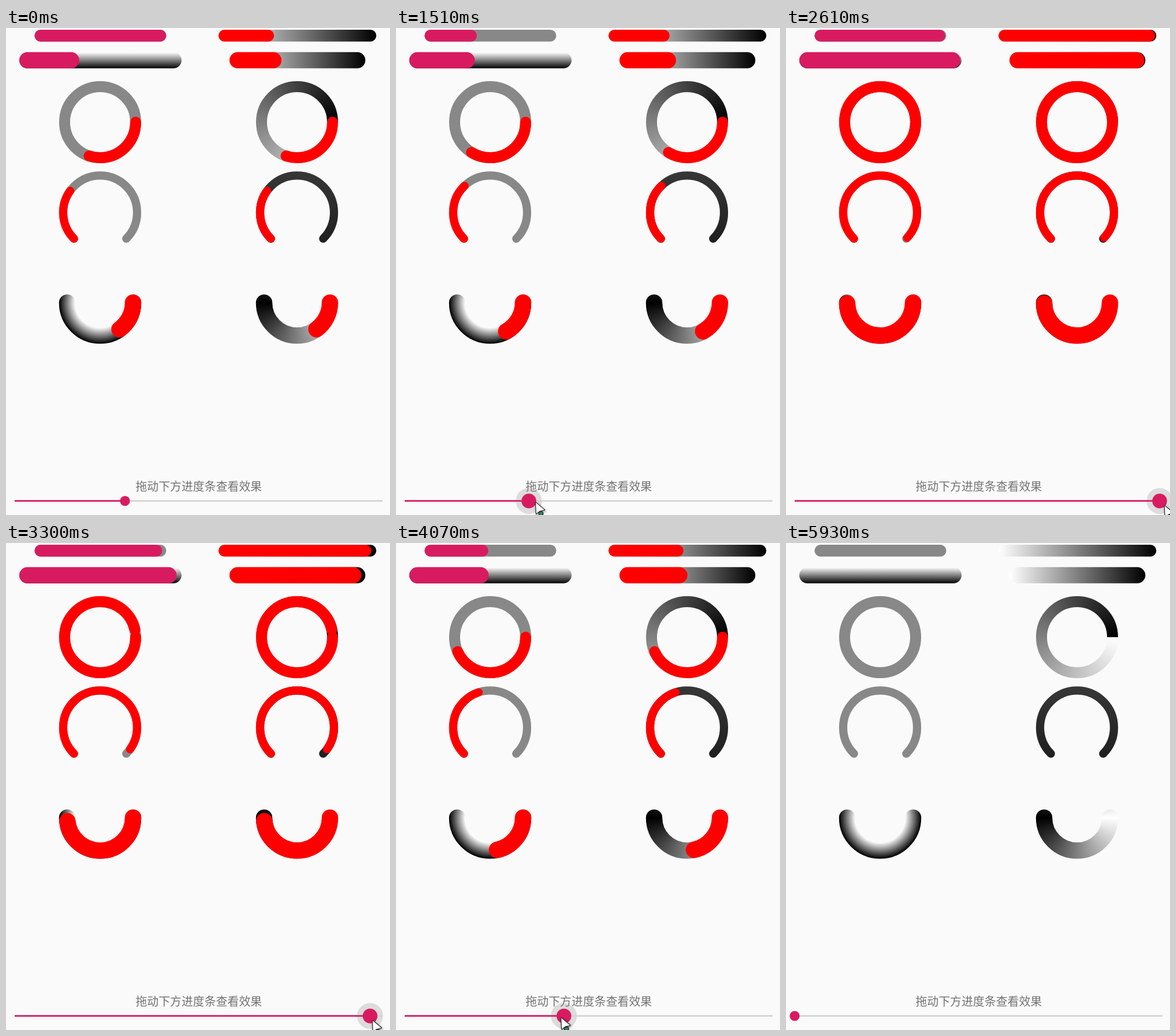
Animation, 665 px wide and 843 px high, one loop 7.11 s. Source, as an HTML page with a canvas:

```html
<!DOCTYPE html>
<html lang="zh-CN">
<head>
<meta charset="utf-8">
<title>进度条</title>
<style>
html, body { margin: 0; width: 100%; height: 100%; overflow: hidden; background: #fafafa; }
canvas { display: block; }
</style>
</head>
<body>
<canvas id="stage" width="665" height="843"></canvas>
<script>
const ctx = document.getElementById('stage').getContext('2d');
const LOOP = 7110, FRAME = 77, TAU = Math.PI * 2, RAD = Math.PI / 180;
const PINK = '#d81b60', RED = '#ff0000', GRAY = '#888888';
const TRACK = { left: 15, right: 652, y: 818.7 };
const REST_X = 206;

const mix = (a, b, k) => a + (b - a) * k;
const ramp = (t, from, to) => Math.min(1, Math.max(0, (t - from) / (to - from)));
const smooth = u => u * u * (3 - 2 * u);
const smoother = u => u * u * u * (u * (6 * u - 15) + 10);
const easeOut = (u, power) => 1 - (1 - u) ** power;

// Each burst of movement advances in discrete steps.
const bursts = [5460, 3300, 1050, 280];
function stepped(t) {
  const start = bursts.find(time => t >= time - 10);
  return start === undefined ? 0 : start + Math.floor((t - start + 10) / FRAME) * FRAME;
}

const forward = t => ramp(t, 1210, 2760);
const back = t => ramp(t, 3210, 4763);

function thumbAt(t) {
  const u = back(t);
  const reached = mix(REST_X, TRACK.right, smoother(forward(t)));
  return mix(reached, TRACK.left, (u + smooth(u)) / 2);
}

// The pointer runs slightly ahead of the thumb while dragging.
function cursorAt(t) {
  if (t < 280) return null;
  if (t < 1140) {
    const arrival = easeOut(ramp(t, 280, 670), 2);
    return [mix(353, REST_X + 6, arrival), mix(834, 818, arrival)];
  }
  if (t < 4700) {
    const out = forward(t), turn = easeOut(back(t), 4);
    const lead = 6 + 15 * Math.sin(Math.PI * out) ** 2 - 12 * turn;
    return [thumbAt(t) + lead, 818 + 8 * out - 6 * turn];
  }
  return t >= 5840 && t < 5920 ? [120, 832] : null;
}

function withStops(gradient, ...colors) {
  colors.forEach((color, i) => gradient.addColorStop(i / (colors.length - 1), color));
  return gradient;
}
const linear = (x0, y0, x1, y1, ...colors) => withStops(ctx.createLinearGradient(x0, y0, x1, y1), ...colors);
const sweep = (x, y, ...colors) => withStops(ctx.createConicGradient(0, x, y), ...colors);
const ringwise = (x, y, r0, r1, ...colors) => withStops(ctx.createRadialGradient(x, y, r0, x, y, r1), ...colors);

const thin = { y: 13.2, width: 20.4 };
const thick = { y: 55.8, width: 28 };
const bars = [
  { ...thin, left: 49.5, right: 277.5, track: GRAY, fill: PINK, startsFull: true },
  { ...thick, left: 23, right: 304, track: linear(0, 42, 0, 70, '#fff', '#000'), fill: PINK },
  { ...thin, left: 368, right: 641.3, track: linear(368, 0, 641, 0, '#fff', '#000'), fill: RED },
  { ...thick, left: 387, right: 622.3, track: linear(387, 0, 622, 0, '#fff', '#000'), fill: RED }
];

const ring = { y: 163, r: 61.5, width: 19, from: 0, span: 360, cap: 'butt' };
const gauge = { y: 319.4, r: 64, width: 14.2, from: 135, span: 270, cap: 'round' };
const bowl = { y: 475.4, r: 57, width: 28.4, from: 0, span: 180, cap: 'round' };
const arcs = [
  { ...ring, x: 163, track: GRAY },
  { ...ring, x: 504, track: sweep(504, ring.y, '#fff', '#000') },
  { ...gauge, x: 163, track: GRAY },
  { ...gauge, x: 504, track: linear(0, 248, 0, 372, '#373737', '#1f1f1f') },
  { ...bowl, x: 163, track: ringwise(163, bowl.y, 43, 71, '#fff', '#000') },
  { ...bowl, x: 504, track: sweep(504, bowl.y, '#fff', '#000', '#fff') }
];

function stroke(style, width, cap) {
  ctx.strokeStyle = style;
  ctx.lineWidth = width;
  ctx.lineCap = cap;
  ctx.stroke();
}

function line(x0, x1, y, width, style, cap = 'round') {
  ctx.beginPath();
  ctx.moveTo(x0, y);
  ctx.lineTo(x1, y);
  stroke(style, width, cap);
}

function disc(x, y, r, style) {
  ctx.beginPath();
  ctx.arc(x, y, r, 0, TAU);
  ctx.fillStyle = style;
  ctx.fill();
}

function drawBar({ left, right, y, width, track, fill }, progress) {
  const x0 = left + width / 2, x1 = right - width / 2;
  line(x0, x1, y, width, track);
  if (progress > 0) line(x0, mix(x0, x1, progress), y, width, fill);
}

function drawArc(arc, progress) {
  const part = (amount, style, cap) => {
    ctx.beginPath();
    ctx.arc(arc.x, arc.y, arc.r, arc.from * RAD, (arc.from + arc.span * amount) * RAD);
    stroke(style, arc.width, cap);
  };
  part(1, arc.track, arc.cap);
  if (progress > 0) part(progress, RED, 'round');
}

function drawCursor([x, y], busyColor) {
  ctx.save();
  ctx.translate(x, y);
  ctx.beginPath();
  [[1, 2], [2, 21], [7.5, 16.5], [16, 14.5]].forEach(point => ctx.lineTo(...point));
  ctx.closePath();
  ctx.lineJoin = 'round';
  ctx.shadowColor = 'rgba(0,0,0,.45)';
  ctx.shadowBlur = 4;
  ctx.shadowOffsetX = 1;
  ctx.shadowOffsetY = 2;
  stroke('#2b2326', 2.4, 'round');
  ctx.shadowColor = 'transparent';
  ctx.fillStyle = '#fff';
  ctx.fill();
  disc(10, 21, 4.5, '#2b2b2b');
  disc(10, 21, 3, busyColor);
  ctx.restore();
}

function draw(time) {
  const t = stepped(time);
  const thumbX = thumbAt(t);
  const progress = (thumbX - TRACK.left) / (TRACK.right - TRACK.left);
  const touched = ramp(t, 1140, 1300);
  const pressed = touched - ramp(t, 5460, 5630);
  const halo = touched - ramp(t, 4670, 4750);
  const cursor = cursorAt(t);

  ctx.fillStyle = '#fafafa';
  ctx.fillRect(0, 0, 665, 843);
  bars.forEach(bar => drawBar(bar, bar.startsFull && !touched ? 1 : progress));
  arcs.forEach(arc => drawArc(arc, progress));

  disc(thumbX, TRACK.y, 22.5, `rgba(0,0,0,${0.12 * halo})`);
  ctx.fillStyle = '#737373';
  ctx.font = '19.9px "Noto Sans CJK SC", "Noto Sans CJK", sans-serif';
  ctx.textAlign = 'center';
  ctx.fillText('拖动下方进度条查看效果', 333.8, 800.5);

  line(TRACK.left, TRACK.right, TRACK.y, 2.8, '#d3d3d3', 'butt');
  line(TRACK.left, thumbX, TRACK.y, 2.8, PINK, 'butt');
  disc(thumbX, TRACK.y, 8.6 + 4.2 * pressed, PINK);

  const busy = Math.cos((t - 1050) / 2660 * TAU) > 0;
  if (cursor) drawCursor(cursor, busy ? '#26866a' : '#555');
}

const began = performance.now();
function tick() {
  draw((performance.now() - began) % LOOP);
  requestAnimationFrame(tick);
}
tick();
</script>
</body>
</html>
```
